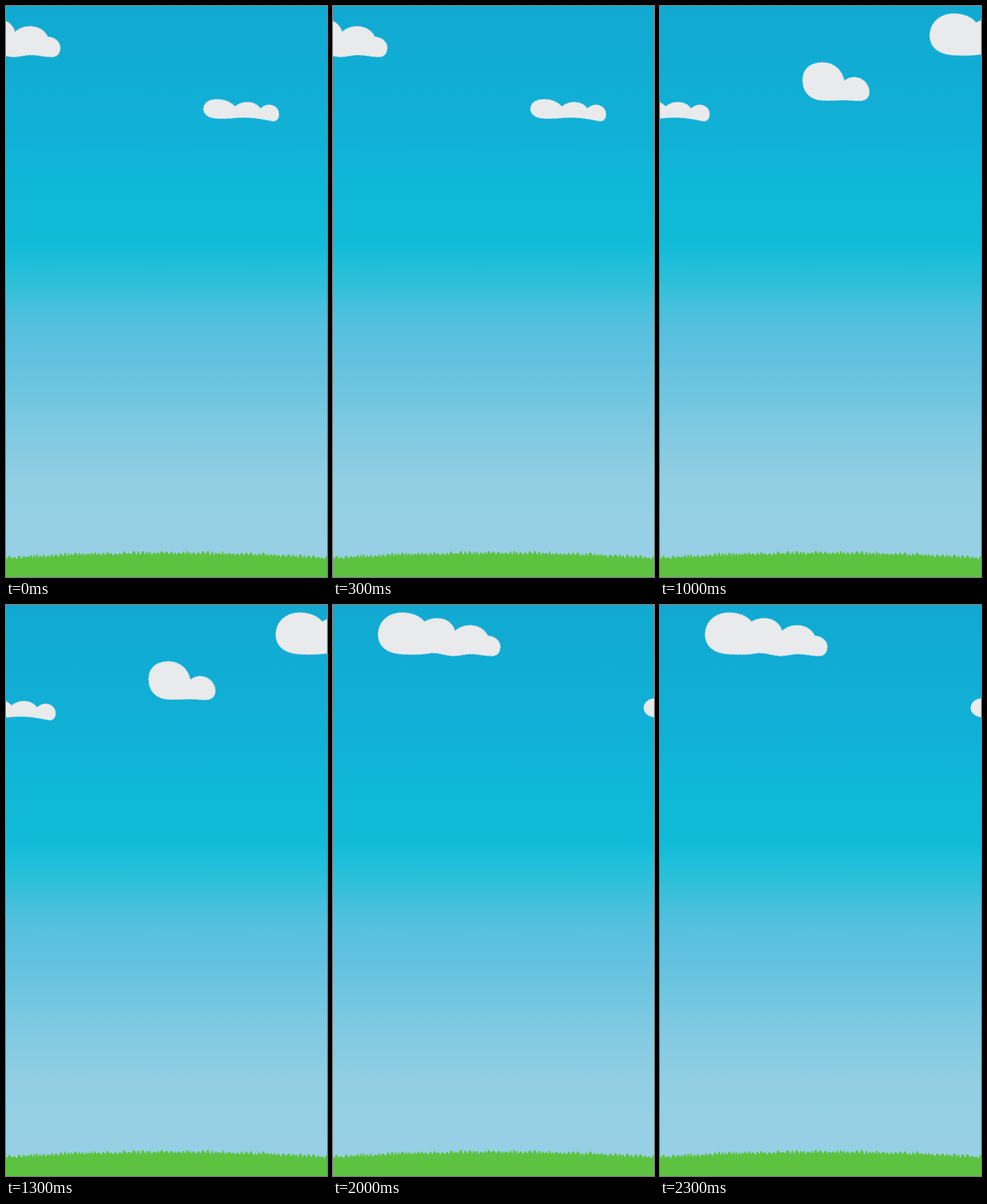
Recreate the animation shown at these times as an HTML page with a canvas. Size 480 by 853 pixels, loop 2500 ms.

```html
<!DOCTYPE html>
<html lang="en">
<head>
<meta charset="utf-8">
<title>Drifting clouds</title>
<style>
  html, body { margin: 0; width: 100%; height: 100%; overflow: hidden; background: #10a9d2; }
  canvas { display: block; width: 480px; height: 853px; }
</style>
</head>
<body>
<canvas id="stage" width="480" height="853"></canvas>
<script>
const W = 480, H = 853, STEP = 500, STEPS = 5;
const ctx = document.getElementById('stage').getContext('2d');

const skyStops = [
  [0, '#11a9d1'], [110, '#11add4'], [210, '#11b2d7'], [255, '#0fb7d7'],
  [355, '#11bbd8'], [385, '#20bfdb'], [410, '#2cbfd9'], [440, '#40c0dc'],
  [480, '#56c0df'], [525, '#61c1e0'], [570, '#6dc5df'], [630, '#7fc9e2'],
  [680, '#8acce2'], [715, '#92cfe3'], [853, '#99d0e5']
];

// Each outline is drawn with its left edge at x = 0; xs holds its place at every step.
const clouds = [
  {
    xs: [-101.5, -270, 403.5, 235.5, 67.5],
    path: 'M0 45C0 25 15 11.5 36 11.5C51 11.5 63 17 69 25C85 16 109 18 115 39' +
          'C127 27 154 26 164 46C176 47 183 55 182.5 63C182 71 178 76 170 76' +
          'C158 76 150 73 139 73C130 73 122 76 112 76C99 75 91 71 79 71.5' +
          'C68 74 54 74 39 73.5C16 73 1 64 0 45Z'
  },
  {
    xs: [550, 382, 213.5, 45.5, -123],
    path: 'M0 111C0 94 11 85 28 84.5C47 84 59 96 62 112C74 102 92 106 98 121' +
          'C102 133 97 141 86 141.5C77 142 69 140 59 140.5C48 141 40 141 32 141' +
          'C13 141 0 130 0 111Z'
  },
  {
    xs: [295.5, 130, -38.5, 633, 465],
    path: 'M0 154C0 144 9 139.5 20 139.5C32 139.5 41 144 47 150.5' +
          'C57 141 77 141 85 153.5C94 144 109 147 112 158C114 166 110 172 104 172' +
          'C97 171 90 169 81 168C69 166 54 166 43 167.5C33 168 24 168.5 16 167.5' +
          'C6 166 0 161 0 154Z'
  }
].map(c => ({ xs: c.xs, shape: new Path2D(c.path) }));

let seed = 19;
const random = () => (seed = (seed * 16807) % 2147483647) / 2147483647;

function makeGrass() {
  const grass = new Path2D();
  const tipLine = x => 815 + 7.5 * ((x - 240) / 240) ** 2;
  let x = -2;
  grass.moveTo(x, H);
  grass.lineTo(x, 824);
  while (x < W + 2) {
    const width = 4 + random() * 4;
    const tip = tipLine(x) + (random() - 0.5) * 3;
    const foot = tipLine(x + width) + 3.5 + random() * 2;
    grass.lineTo(x + width * 0.3, tip + 0.5);
    grass.quadraticCurveTo(x + width * 0.5, tip - 1, x + width * 0.65, tip + 1);
    grass.lineTo(x + width, foot);
    x += width;
  }
  grass.lineTo(W + 10, H);
  grass.closePath();
  return grass;
}

const sky = ctx.createLinearGradient(0, 0, 0, H);
skyStops.forEach(([y, color]) => sky.addColorStop(y / H, color));
const grass = makeGrass();

function drawCloud({ xs, shape }, step) {
  ctx.save();
  ctx.translate(xs[step], 0);
  ctx.fill(shape);
  ctx.stroke(shape);
  ctx.restore();
}

function draw(now) {
  const step = Math.floor(now / STEP) % STEPS;
  ctx.fillStyle = sky;
  ctx.fillRect(0, 0, W, H);

  // A short dashed stroke gives the clouds their fuzzy rim.
  ctx.fillStyle = ctx.strokeStyle = '#e9eaec';
  ctx.lineWidth = 1.4;
  ctx.setLineDash([1.6, 1.8]);
  clouds.forEach(cloud => drawCloud(cloud, step));

  ctx.fillStyle = '#5cc240';
  ctx.fill(grass);
}

const start = performance.now();
function tick() {
  draw(performance.now() - start);
  requestAnimationFrame(tick);
}
tick();
</script>
</body>
</html>
```
